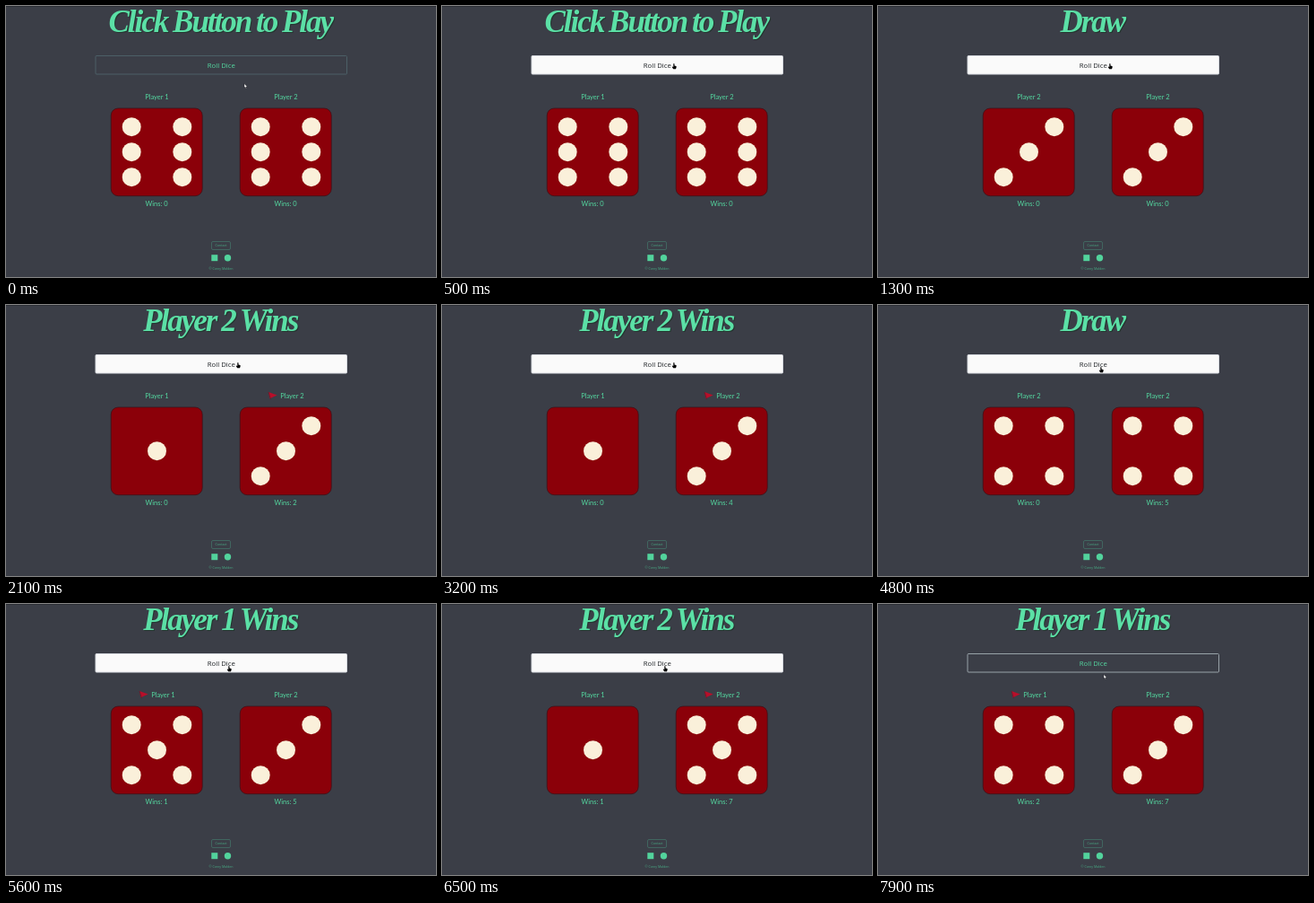
Write an HTML page that moves like this. It is 480 by 302 pixels and loops after 8000 ms.

```html
<!DOCTYPE html>
<html lang="en">
<head>
<meta charset="utf-8">
<title>Dice game</title>
<style>
html, body { margin: 0; width: 100%; height: 100%; overflow: hidden; background: #3b3e47; }
svg { display: block; width: 100vw; height: 100vh; }
text { text-anchor: middle; fill: #54d8a0; }
.title { font: italic bold 35px "Liberation Serif", serif; letter-spacing: -2px; word-spacing: -1px; fill: #5be0a6; }
.shade { fill: #24352f; }
.label { font: 7.5px Lato, sans-serif; }
#roll { font: 7.8px "Open Sans", sans-serif; }
.tiny { font: 3.6px "Open Sans", sans-serif; fill: #48ad86; }
</style>
</head>
<body>
<svg viewBox="0 0 480 302">
  <rect width="480" height="1" fill="#2b2d34"/>
  <text class="title shade" x="240.3" y="29.6"></text>
  <text class="title" x="239.3" y="28.6"></text>
  <rect id="button" x="100" y="55.5" width="280.5" height="20.5" rx="1"/>
  <text id="roll" x="240.3" y="69.1">Roll Dice</text>
  <g id="players"></g>
  <rect x="229.5" y="262.5" width="21" height="9" rx="1.5" fill="none" stroke="#437068" stroke-width=".8"/>
  <text class="tiny" x="240" y="268.4">Contact</text>
  <rect x="229.3" y="277.2" width="7" height="7" fill="#52d39c"/>
  <circle cx="247.5" cy="280.7" r="3.7" fill="#52d39c"/>
  <text class="tiny" x="240" y="294.3">© Corey Malden</text>
  <path id="arrow" d="M0 -.5V4L1 3.2L1.8 4.8L2.6 4.5L1.8 3H3.3Z" fill="#fff" stroke="#15161a" stroke-width=".4"/>
  <path id="hand" d="M-.7 -.6Q0 -1.2 .5 -.5V1.4L2.3 2Q2.9 2.4 2.6 3.5L2 5.2H-.8L-2.3 2.9Q-2.1 2 -.7 2.9Z"/>
</svg>
<script>
const LOOP = 8000, FADE = 150, MOVE = 250;
const $ = id => document.getElementById(id);

// time of each click and the two faces rolled
const rolls = [
  [700, 3, 3], [1700, 4, 6], [2100, 1, 3], [2700, 2, 3], [3200, 1, 3], [3600, 1, 3],
  [4800, 4, 4], [5400, 5, 3], [6000, 3, 5], [6500, 1, 5], [7000, 4, 3]
];
// time at which the mouse arrives at x, y
const stops = [
  [0, 266, 87], [400, 259, 65], [4350, 247, 75.5], [4650, 249, 70], [7500, 253, 112], [7850, 252, 79]
];
const hovers = [[250, 4100], [4500, 7300]];

const clamp = v => Math.min(1, Math.max(0, v));
const ease = v => v * v * (3 - 2 * v);
const lerp = (a, b, k) => a + (b - a) * k;
const mix = (a, b, k) => `rgb(${a.map((v, i) => Math.round(lerp(v, b[i], k)))})`;

// dx, dy in -1..1 from the middle of the die
function hasPip(face, dx, dy) {
  if (!dx) return !dy && face % 2 === 1;
  if (!dy) return face === 6;
  return face > (dx === -dy ? 1 : 3);
}

function pipsOf(face) {
  let out = "";
  for (const dx of [-1, 0, 1])
    for (const dy of [-1, 0, 1])
      if (hasPip(face, dx, dy))
        out += `<circle cx="${168.5 + 28.3 * dx}" cy="${162.7 + 28 * dy}" r="10.5" fill="#faf0da"/>`;
  return out;
}

function playerMarkup(i, name, face, wins, won) {
  const shift = won ? 7 : 0;
  const flag = `<path d="M149 97L158.6 100.6L150.4 104.2Z" fill="#b80f2a"/>
    <path d="M149 97L151.5 105.2" stroke="#651b2b" stroke-width=".8"/>`;
  return `<g transform="translate(${144 * i})">
    ${won ? flag : ""}
    <text class="label" x="${168.4 + shift}" y="104">${name}</text>
    <rect x="117.2" y="114" width="102" height="97.7" rx="8" fill="#8b0009" stroke="#3a1018" stroke-width=".7"/>
    ${pipsOf(face)}
    <text class="label" x="168" y="222.5">Wins: ${wins}</text></g>`;
}

let shown = -1;
function drawGame(t) {
  const done = rolls.filter(r => r[0] <= t), started = done.length > 0;
  if (done.length === shown) return;
  shown = done.length;
  const [, a, b] = done.at(-1) || [0, 6, 6];
  const sign = Math.sign(a - b), winner = sign > 0 ? 1 : 2;
  const title = !started ? "Click Button to Play" : sign ? `Player ${winner} Wins` : "Draw";
  document.querySelectorAll(".title").forEach(e => e.textContent = title);
  const wins = [done.filter(r => r[1] > r[2]).length, done.filter(r => r[1] < r[2]).length];
  // a draw labels both sides "Player 2"
  const left = started && !sign ? "Player 2" : "Player 1";
  $("players").innerHTML =
    playerMarkup(0, left, a, wins[0], sign > 0) +
    playerMarkup(1, "Player 2", b, wins[1], sign < 0);
}

function mouseAt(t) {
  let [, x, y] = stops[0];
  for (const [end, nx, ny] of stops.slice(1)) {
    const k = ease(clamp((t - end + MOVE) / MOVE));
    x = lerp(x, nx, k);
    y = lerp(y, ny, k);
  }
  return [x, y];
}

function drawButton(t) {
  const hover = Math.max(...hovers.map(([on, off]) => clamp((t - on) / FADE) - clamp((t - off) / FADE)));
  const over = hovers.some(([on, off]) => t >= on && t < off);
  const focused = t >= rolls[0][0];
  const border = focused ? [152, 162, 168] : [76, 95, 103];
  $("button").style.fill = mix([59, 62, 71], [250, 250, 250], hover);
  $("button").style.stroke = mix(border, [214, 217, 223], hover);
  $("roll").style.fill = mix([84, 216, 160], [33, 37, 41], hover);
  $("arrow").style.display = over ? "none" : "";
  $("hand").style.display = over ? "" : "none";
  for (const id of ["arrow", "hand"]) $(id).setAttribute("transform", `translate(${mouseAt(t)})`);
}

function frame(now) {
  const t = now % LOOP;
  drawGame(t);
  drawButton(t);
  requestAnimationFrame(frame);
}
frame(0);
</script>
</body>
</html>
```
